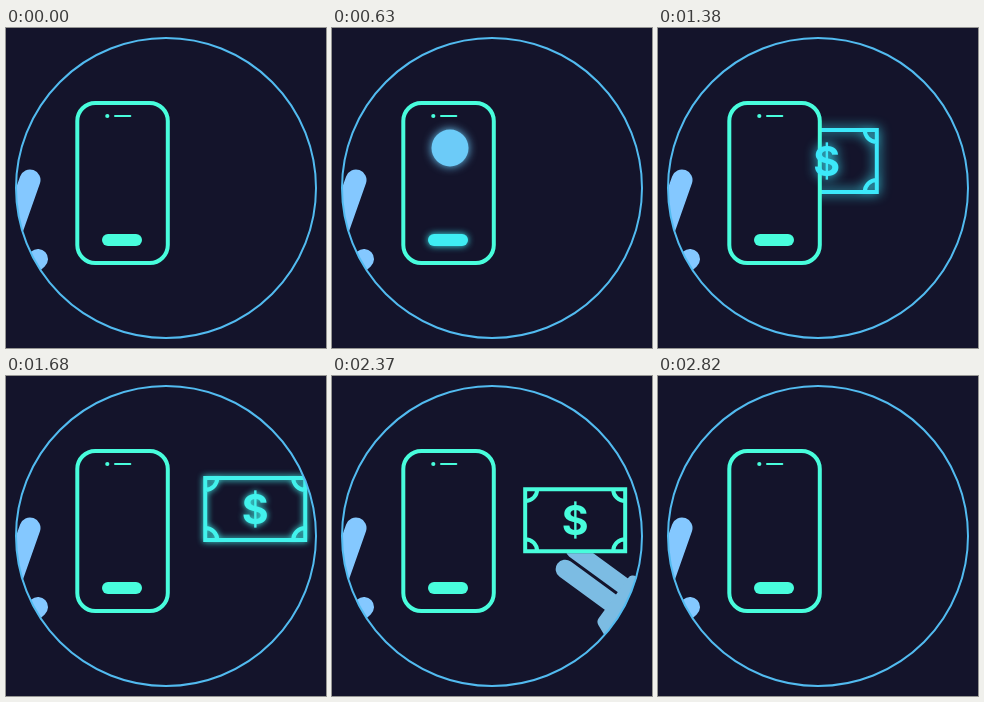
Recreate the animation shown at these times as an HTML page with a canvas. Size 320x320 px, loop 3.03 s.

```html
<!DOCTYPE html>
<html lang="en">
<head>
<meta charset="utf-8">
<title>Phone payment</title>
<style>
html, body { margin: 0; width: 100%; height: 100%; overflow: hidden; background: #14142b; }
canvas { display: block; width: 100%; height: 100%; }
</style>
</head>
<body>
<canvas id="stage" width="320" height="320"></canvas>
<script>
const LOOP = 3030, STEP = 30;
const BG = '#14142b', RING = '#52bbf0', BLUE = '#84c8ff', PALE = '#7cbce3', COIN = '#6ccbf8';
const GREEN = [72, 253, 220], CYAN = [60, 232, 250];
const c = document.getElementById('stage').getContext('2d');

// Smooth 0..1 progress between two times
function ease(t, from, to) {
  const u = Math.min(1, Math.max(0, (t - from) / (to - from)));
  return u * u * (3 - 2 * u);
}

function mix(k) {
  return `rgb(${GREEN.map((g, i) => Math.round(g + (CYAN[i] - g) * k))})`;
}

function layer(draw) {
  c.save();
  draw();
  c.restore();
}

function glow(color, size) {
  c.shadowColor = color;
  c.shadowBlur = size;
}

function box(x, y, w, h, r) {
  c.beginPath();
  c.roundRect(x, y, w, h, r);
}

function disc(x, y, r) {
  c.beginPath();
  c.arc(x, y, r, 0, 7);
  c.fill();
}

function capsule(x1, y1, x2, y2, r) {
  c.lineCap = 'round';
  c.lineWidth = 2 * r;
  c.beginPath();
  c.moveTo(x1, y1);
  c.lineTo(x2, y2);
  c.stroke();
}

function palm(points) {
  c.lineJoin = 'round';
  c.lineWidth = 12;
  c.beginPath();
  points.forEach(p => c.lineTo(...p));
  c.closePath();
  c.fill();
  c.stroke();
}

// Swings around an elbow outside the stage
function tapHand(k) {
  c.fillStyle = c.strokeStyle = BLUE;
  c.translate(-30, 344);
  c.rotate(k * Math.PI / 6);
  c.translate(30, -344);
  capsule(24, 152, -6, 237, 10.5);
  capsule(32, 231, 2, 258, 10);
  palm([[-18, 215], [-3, 235], [0, 258], [-30, 320], [-85, 300], [-62, 225]]);
}

function takeHand(x, y) {
  c.fillStyle = c.strokeStyle = PALE;
  c.translate(x, y);
  c.rotate(0.63);
  capsule(0, 0, 80, 0, 9.5);
  capsule(-4, -21, 80, -21, 8.5);
  palm([[62, -30], [62, 20], [90, 32], [200, 32], [200, -40]]);
}

function bill(x, y, color, shine) {
  c.translate(x, y);
  c.fillStyle = BG;
  c.fillRect(0, 0, 104, 66);
  c.strokeStyle = color;
  c.lineWidth = 4;
  glow(color, 12 * shine);
  c.beginPath();
  c.rect(2, 2, 100, 62);
  for (const [cx, cy, a] of [[2, 2, 0], [102, 2, 1], [102, 64, 2], [2, 64, 3]]) {
    const start = a * Math.PI / 2;
    c.moveTo(cx + 12 * Math.cos(start), cy + 12 * Math.sin(start));
    c.arc(cx, cy, 12, start, start + Math.PI / 2);
  }
  c.stroke();
}

function dollar(x, y, color, shine) {
  c.fillStyle = color;
  glow(color, 12 * shine);
  c.font = '700 41px Inter, "Liberation Sans", sans-serif';
  c.textAlign = 'center';
  c.fillText('$', x, y + 15);
}

function phone(lit) {
  c.fillStyle = BG;
  c.strokeStyle = mix(0);
  c.lineWidth = 4;
  box(71.3, 75, 90.5, 160, 18);
  c.fill();
  c.stroke();
  c.fillStyle = mix(0);
  disc(101.3, 88, 2.1);
  capsule(109, 88, 124.3, 88, 1);
  c.fillStyle = mix(lit);
  glow(mix(lit), 10 * lit);
  box(96, 206, 40, 12, 6);
  c.fill();
}

function draw(t) {
  c.fillStyle = BG;
  c.fillRect(0, 0, 320, 320);

  const out = ease(t, 1130, 1720), back = ease(t, 1720, 2050);
  const pull = 51 * Math.pow(Math.max(0, t - 2250) / 330, 1.5);
  const x = 65 + 134 * out - 19 * back + pull;
  const y = 100 + pull;
  const shine = 1 - ease(t, 1380, 2000);
  const color = mix(shine);
  const swap = ease(t, 1130, 1270);
  const paying = t > 1130 && t < 2820;

  layer(() => {
    c.beginPath();
    c.arc(160, 160, 150, 0, 7);
    c.clip();
    if (paying) {
      const away = 1 - ease(t, 1950, 2250);
      layer(() => takeHand(222 + 111 * away + pull, 182 + 65 * away + pull));
      layer(() => bill(x, y, color, shine));
    }
    layer(() => phone(ease(t, 270, 390) * (1 - ease(t, 480, 940))));
    layer(() => {
      c.globalAlpha = ease(t, 330, 600) * (1 - swap);
      c.fillStyle = COIN;
      glow(COIN, 10);
      disc(x + 53, 120 + 12 * swap, 18.5);
    });
    if (paying) layer(() => {
      c.globalAlpha = swap;
      dollar(x + 52, y + 32.5, color, shine);
    });
    layer(() => tapHand(ease(t, 45, 300) - ease(t, 330, 630)));
  });

  c.strokeStyle = RING;
  c.lineWidth = 2;
  c.beginPath();
  c.arc(160, 160, 150, 0, 7);
  c.stroke();
}

const begin = performance.now();
function tick() {
  const t = (performance.now() - begin) % LOOP;
  draw(Math.floor(t / STEP) * STEP);
  requestAnimationFrame(tick);
}
tick();
</script>
</body>
</html>
```
